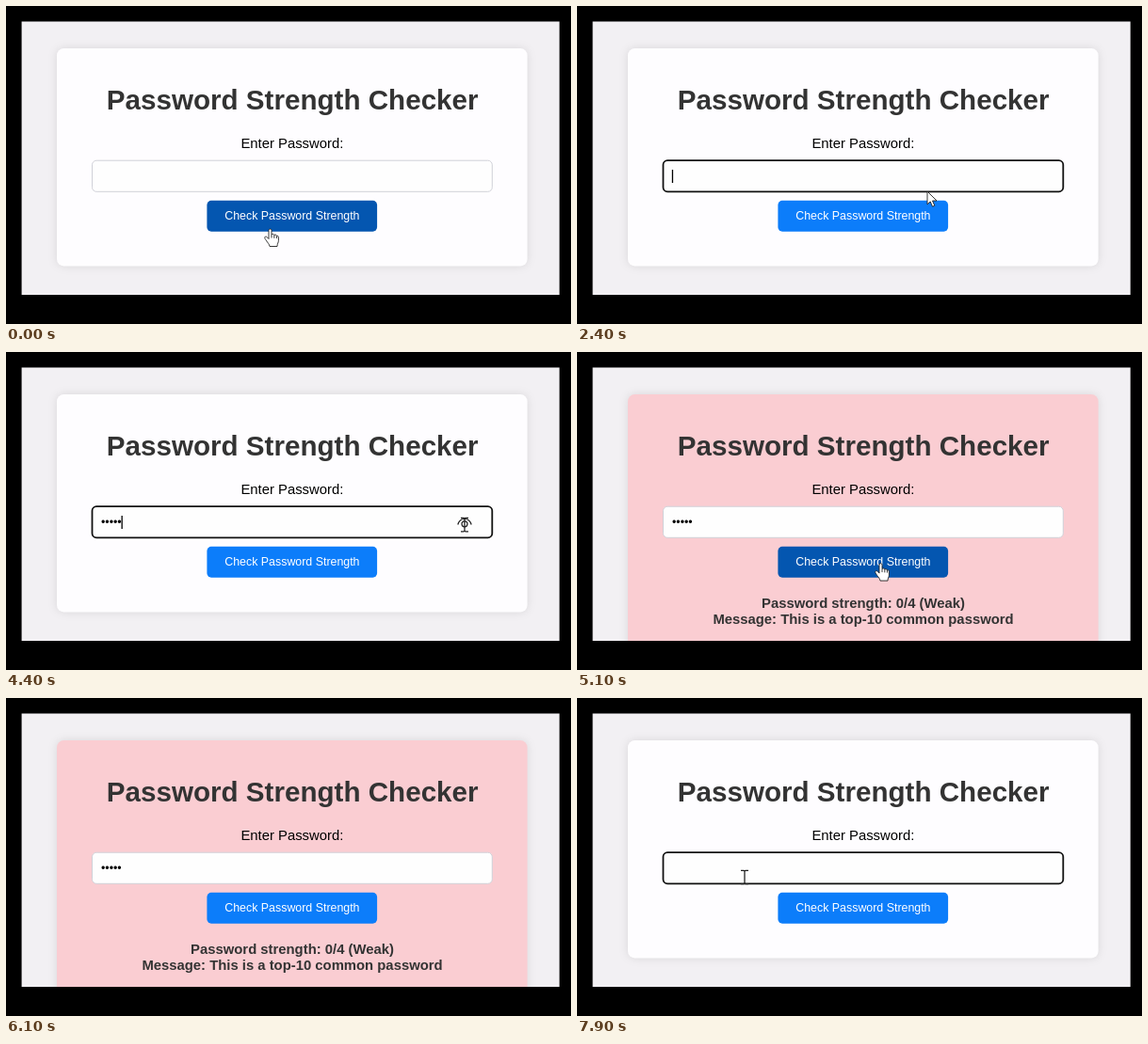
These frames come from a looping animation (600x338 px, 8000 ms). An HTML page:

```html
<!DOCTYPE html>
<html lang="en">
<head>
<meta charset="utf-8">
<title>Password Strength Checker</title>
<style>
  html, body { margin: 0; width: 100%; height: 100%; overflow: hidden; background: #000; }
  svg { display: block; width: 100vw; height: 100vh; }
  text { font-family: "Liberation Sans", Arial, sans-serif; font-size: 14.85px; text-anchor: middle; }
  .bold { font-weight: bold; fill: #333; }
  .title { font-size: 29.6px; }
  .small { font-size: 12.4px; }
  #panel { fill: #fefdff; height: 231.5px; filter: drop-shadow(0 0 4.6px rgba(0, 0, 0, .1)); }
  #field { fill: #fefefe; stroke: #d0d1d8; }
  #button { fill: #0c7dfa; }
  #dots { text-anchor: start; }
  .weak #panel { fill: #facdd2; height: 290px; }
  .focused #field { stroke: #111; stroke-width: 1.8px; }
  .hover #button { fill: #0456b0; }
  .line { fill: none; stroke: #222; }
  .pointer { fill: #fff; stroke: #222; stroke-width: .9; stroke-linejoin: round; }
</style>
</head>
<body>
<svg id="stage" viewBox="0 0 600 338">
  <defs><clipPath id="page"><rect x="16.6" y="16.6" width="571.1" height="290.4"/></clipPath></defs>
  <g clip-path="url(#page)">
    <rect width="600" height="338" fill="#f2f0f3"/>
    <rect id="panel" x="54" y="45" width="499.6" rx="7.4"/>
    <text class="bold title" x="304.2" y="110.2">Password Strength Checker</text>
    <text x="303.9" y="151">Enter Password:</text>
    <rect id="field" x="91.5" y="164.2" width="424.8" height="33.1" rx="4.6"/>
    <text id="dots" class="small" x="101" y="184.8"></text>
    <rect id="caret" y="174" width="1.3" height="14"/>
    <g id="eye" class="line" stroke-width="1.2">
      <path d="M479.8 183.5C482 175.5 492 175.5 494.2 183.5"/>
      <circle cx="487" cy="182.8" r="3"/>
    </g>
    <rect id="button" x="213.4" y="206.8" width="180.7" height="32.9" rx="4.6"/>
    <text class="small" x="303.9" y="227.4" fill="#fff">Check Password Strength</text>
    <g id="result">
      <text class="bold" x="304" y="272">Password strength: 0/4 (Weak)</text>
      <text class="bold" x="304" y="289">Message: This is a top-10 common password</text>
    </g>
    <g id="cursor">
      <path id="arrow" class="pointer" d="M0 0V13.8L3.2 10.9 5.5 16.2 7.8 15.2 5.5 10H10Z"/>
      <path id="hand" class="pointer" d="M-2 10.5V1.4C-2-.4 1-.4 1 1.4V6C1.6 5 3.6 5.2 3.8 6.6 4.6 5.7 6.2 6 6.4 7.4 7.2 6.8 8.4 7.4 8.4 8.8V12.5C8.4 14.5 7 15.5 7 18.5H-1C-1.4 16-3.2 14.5-4.3 12.8-5.3 11.2-6.6 9.8-6.2 8.8-5.6 7.6-4.2 8-3.4 9ZM1 6V9.5M3.8 6.6V9.8M6.4 7.4V10"/>
      <path id="beam" class="line" stroke-width="1.3" d="M-4-7H-1L0-6 1-7H4M0-6V6.4M-4 7.4H-1L0 6.4 1 7.4H4"/>
    </g>
  </g>
</svg>
<script>
const LOOP = 8000, STEP = 100, BLINK = 530;
const CLICK = 1170, SUBMIT = 5100, LEAVE = 6100, RELOAD = 6600, RETURN = 6800, REFOCUS = 7300;
const keys = [3000, 3500, 3700, 3900, 4000];

// Pointer stops: where it is, when it arrives and when it sets off again
const stops = [
  { x: 281, y: 237, at: 0, until: 0 },
  { x: 103.4, y: 92, at: 800, until: 800 },
  { x: 274, y: 195, at: 1200, until: 1800 },
  { x: 340, y: 216, at: 2000, until: 2000 },
  { x: 455, y: 208, at: 2200, until: 2200 },
  { x: 372, y: 197, at: 2400, until: 4100 },
  { x: 487, y: 183.5, at: 4400, until: 4500 },
  { x: 323, y: 224.6, at: 5000, until: 5300 },
  { x: 214, y: 190, at: 5800, until: 5900 },
  { x: 36, y: 113, at: 6000, until: RETURN },
  { x: 178, y: 190.3, at: REFOCUS, until: LOOP }
];

const $ = id => document.getElementById(id);
const between = (v, a, b) => v >= a && v < b;
const ease = k => k * k * (3 - 2 * k);
const show = (id, on) => $(id).setAttribute("display", on ? "inline" : "none");
const mark = (name, on) => $("stage").classList.toggle(name, on);

function pointerAt(t) {
  const i = stops.findLastIndex(s => s.at <= t);
  const a = stops[i], b = stops[i + 1] || a;
  const k = t > a.until ? ease((t - a.until) / (b.at - a.until)) : 0;
  return { x: a.x + (b.x - a.x) * k, y: a.y + (b.y - a.y) * k };
}

// The caret restarts its blink at every click or key
function caretLit(t) {
  const last = Math.max(...[CLICK, ...keys, REFOCUS].filter(s => s <= t));
  return Math.floor((t - last) / BLINK) % 2 === 0;
}

function render(t) {
  const { x, y } = pointerAt(t);
  const onButton = between(x, 213, 394) && between(y, 207, 240);
  const onField = between(x, 91, 517) && between(y, 164, 196.5);
  const focused = between(t, CLICK + 300, SUBMIT) || t >= REFOCUS;
  const weak = between(t, SUBMIT, RELOAD);
  const count = t < RELOAD ? keys.filter(k => k <= t).length : 0;

  mark("weak", weak);
  mark("focused", focused);
  mark("hover", onButton);

  $("dots").textContent = "•".repeat(count);
  $("caret").setAttribute("x", 100.8 + 4.34 * count);
  show("caret", focused && caretLit(t));
  show("eye", focused && count > 0);
  show("result", weak);

  $("cursor").setAttribute("transform", `translate(${x} ${y})`);
  show("cursor", !between(t, LEAVE, RETURN));
  show("hand", onButton);
  show("beam", onField);
  show("arrow", !onButton && !onField);
}

const start = performance.now();
function tick() {
  const t = (performance.now() - start) % LOOP;
  render(Math.floor(t / STEP) * STEP);
  requestAnimationFrame(tick);
}
tick();
</script>
</body>
</html>
```
